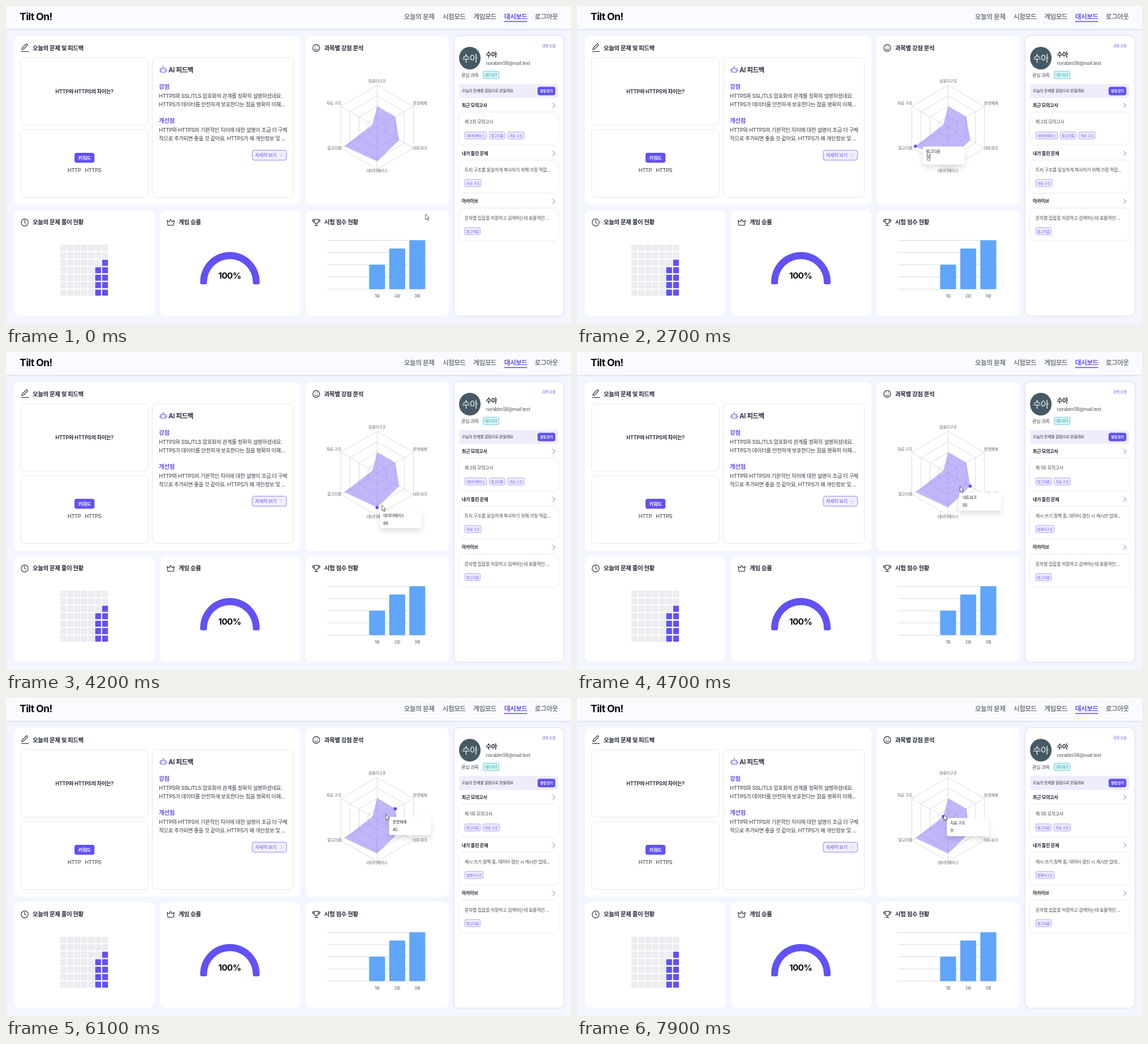
An HTML page for the animation above (8 s loop, 998 by 561 pixels).

```html
<!DOCTYPE html>
<html lang="ko">
<head>
<meta charset="utf-8">
<style>
html, body { margin: 0; height: 100%; overflow: hidden; background: #f3f5ff; }
svg { display: block; width: 998px; height: 561px; }
text { font-family: Inter, "Noto Sans CJK KR", "Noto Sans CJK", sans-serif; letter-spacing: -.04em; white-space: pre; }
.line { fill: none; stroke: #3d4353; stroke-width: 1.3; stroke-linecap: round; stroke-linejoin: round; }
.soft { filter: drop-shadow(0 0 2px rgba(60, 60, 110, .16)); }
#tip rect { filter: drop-shadow(0 5px 5px rgba(0, 0, 0, .13)); }
</style>
</head>
<body>
<svg id="stage" viewBox="0 0 998 561"></svg>
<script>
const PURPLE = '#6151f6', INK = '#222936', GREY = '#444b57';
const stage = document.getElementById('stage');

// ---- drawing helpers ----
const text = (x, y, size, str, fill = INK, weight = 400, anchor = 'start') =>
  `<text x="${x}" y="${y}" font-size="${size}" fill="${fill}" font-weight="${weight}" text-anchor="${anchor}">${str}</text>`;
const rect = (x, y, w, h, r, fill, extra = '') =>
  `<rect x="${x}" y="${y}" width="${w}" height="${h}" rx="${r}" fill="${fill}" ${extra}/>`;
const line = (d, extra = '') => `<path class="line" d="${d}" ${extra}/>`;
const tag = (x, y, w, str) =>
  rect(x + .4, y + .4, w - .8, 12.6, 2, '#f0eefe', 'stroke="#988ef9" stroke-width=".8"') +
  text(x + w / 2, y + 9, 6.2, str, PURPLE, 500, 'middle');
const chevron = (x, y, w, h, color, width) =>
  line(`M${x} ${y}l${w} ${h}l${-w} ${h}`, `style="stroke:${color};stroke-width:${width}"`);

// ---- radar geometry ----
const CX = 655.5, CY = 214, R = 74;
const axes = [
  ['컴퓨터구조', 40, .5], ['운영체제', 40, .5], ['네트워크', 50, .61],
  ['데이터베이스', 66, .815], ['알고리즘', 72, .9], ['자료 구조', 11, .13]
];
const polar = (i, r) => {
  const a = i * Math.PI / 3;
  return [CX + r * Math.sin(a), CY - r * Math.cos(a)];
};
const hexagon = radius => axes.map((a, i) => polar(i, radius(a))).join(' ');

function header() {
  let s = rect(0, 0, 998, 40, 0, '#fafbff', 'style="filter:drop-shadow(0 1px 2px rgba(60,60,110,.14))"');
  s += text(24, 25.3, 17.8, 'Tilt On!', '#0b0b0f', 700);
  [[703, '오늘의 문제'], [771, '시험모드'], [825.5, '게임모드'], [880, '대시보드'], [934, '로그아웃']].forEach(([x, str], i) => {
    s += text(x, 22.6, 11.6, str, i == 3 ? PURPLE : '#333a46', i == 3 ? 600 : 500);
  });
  return s + rect(880, 26.6, 40.5, 1.6, 0, PURPLE);
}

function panels() {
  const boxes = [[14, 53, 506, 297.5], [529, 53, 253, 297.5], [14, 360.5, 248.5, 186], [272, 360.5, 248, 186], [529, 360.5, 253, 186]];
  const titles = [[47, 77.8, '오늘의 문제 및 피드백'], [562, 77.8, '과목별 강점 분석'], [47, 385.4, '오늘의 문제 풀이 현황'], [305, 385.4, '게임 승률'], [562, 385.4, '시험 점수 현황']];
  return boxes.map(b => rect(...b, 9, '#fff')).join('') +
    rect(792, 53, 192.5, 493.5, 9, '#fff', 'class="soft"') +
    titles.map(([x, y, str]) => text(x, y, 10.5, str, INK, 600)).join('') +
    line('M28 77l.6-3 7-7q1-.8 2 .2t.2 2l-7 7zM27 80.3h13') +
    '<circle class="line" cx="548" cy="74" r="6"/>' + line('M545.3 75.6q2.7 3 5.4 0M546 72v.3M550 72v.3') +
    '<circle class="line" cx="33" cy="381.8" r="6.2"/>' + line('M33 378v4l2.4 1.3') +
    line('M286 386.8l-1.3-8.6 3.6 2.6 2.6-4.4 2.6 4.4 3.6-2.6-1.3 8.6z') +
    line('M544.6 376.3h7v4q0 3.6-3.5 3.6t-3.5-3.6zM544.6 377.5h-3q0 4 3.4 4M551.6 377.5h3q0 4-3.4 4M548.1 384v3M545.4 387.4h5.4');
}

function feedback() {
  const border = 'stroke="#e3e5ea" stroke-width=".9"';
  return rect(25.8, 91, 225.4, 119, 7, '#fff', border) + rect(25.8, 218, 225.4, 119.6, 7, '#fff', border) +
    rect(258.5, 91, 249.2, 246.6, 7, '#fff', border) +
    text(138.5, 153.5, 9.3, 'HTTP와 HTTPS의 차이는?', INK, 600, 'middle') +
    rect(121, 259, 35.3, 17.4, 4, PURPLE) + text(138.6, 271, 8.4, '키워드', '#fff', 600, 'middle') +
    text(108.7, 292.6, 9.3, 'HTTP', '#333a46') + text(139.2, 292.6, 9.3, 'HTTPS', '#333a46') +
    line('M273.5 110h8.5v6.8h-8.5zM277.8 110v-3.4M271.8 112.5v2M283.7 112.5v2M276 112.8v.5M279.6 112.8v.5M277.8 106v-.3', `style="stroke:${PURPLE};stroke-width:1.1"`) +
    text(287, 116.6, 11.6, 'AI 피드백', INK, 600) +
    text(270, 146, 10.5, '강점', PURPLE, 600) + text(270, 206, 10.5, '개선점', PURPLE, 600) +
    ['HTTPS와 SSL/TLS 암호화의 관계를 정확히 설명하셨네요.', 'HTTPS가 데이터를 안전하게 보호한다는 점을 명확히 이해...',
      'HTTP와 HTTPS의 기본적인 차이에 대한 설명이 조금 더 구체', '적으로 추가되면 좋을 것 같아요. HTTPS가 왜 개인정보 및 ...']
      .map((str, i) => text(270, [162, 177, 222.4, 237.4][i], 9.35, str, '#333a46')).join('') +
    rect(435, 254.4, 60.6, 17.6, 4, '#f0eefe', 'stroke="#8379f8" stroke-width=".9"') +
    text(440, 266.4, 8.1, '자세히 보기', PURPLE, 500) + chevron(485.2, 260.8, 2.4, 2.5, '#a79ffa', .8);
}

function radar() {
  let s = '';
  for (let k = 1; k <= 4; k++) s += `<polygon points="${hexagon(() => R * k / 4)}" fill="none" stroke="#ccc" stroke-width=".7"/>`;
  axes.forEach((a, i) => { s += `<path d="M${CX} ${CY}L${polar(i, R)}" stroke="#ccc" stroke-width=".7"/>`; });
  s += `<polygon points="${hexagon(a => R * a[2])}" fill="#8171f7" fill-opacity=".5"/>`;
  const spots = [[CX, 135, 'middle'], [718.8, 174.4], [718.8, 253], [CX, 292.6, 'middle'], [592.2, 253, 'end'], [592.2, 174.4, 'end']];
  spots.forEach(([x, y, anchor], i) => { s += text(x, y, 7.05, axes[i][0], '#666', 400, anchor); });
  return s;
}

function charts() {
  let s = '';
  for (let c = 0; c < 7; c++) for (let r = 0; r < 7; r++) {
    const on = c == 6 && r > 1 || c == 5 && r > 2;
    s += rect(96.3 + c * 12.25, 421.3 + r * 13.15, 10.3, 10.8, 1.2, on ? PURPLE : '#ecedf0', on ? '' : 'stroke="#e2e3e6" stroke-width=".5"');
  }
  s += `<path d="M343 488q0 3 3 3h6q3 0 3-3v-1A40.5 40.5 0 0 1 436 487v1q0 3 3 3h6q3 0 3-3v-1.5A52.5 52.5 0 0 0 343 486.5z" fill="${PURPLE}"/>`;
  s += text(395, 481.4, 15.2, '100%', '#0b0b0f', 700, 'middle');
  for (let k = 0; k < 5; k++) s += rect(567, 413 + k * 21.5, 177, .8, 0, '#d0d2d6');
  [456.3, 427.8, 413.2].forEach((y, i) => {
    const x = 641.4 + i * 35.5;
    s += rect(x, y, 28.2, 499.5 - y, 2, '#60a5fa') + text(x + 14.1, 514.4, 7, `${i + 1}회`, '#555', 400, 'middle');
  });
  return s;
}

function sidebar() {
  let s = text(946.8, 72.6, 6.4, '과목 수정', PURPLE, 500) +
    '<ellipse cx="819.3" cy="92" rx="19" ry="20" fill="#455a64"/>' +
    text(819.3, 97.8, 15.6, '수아', '#fff', 400, 'middle') +
    text(847.5, 90.3, 11.2, '수아', INK, 600) +
    text(847.5, 103.6, 8.3, 'norabim58@mail.test', '#6b7079', 500) +
    text(804, 124.5, 8.2, '관심 과목', GREY) +
    rect(843, 115, 27.6, 13, 2, '#dcf6f8', 'stroke="#45bccb" stroke-width=".8"') +
    text(856.8, 124, 6.25, '네트워크', '#129bad', 500, 'middle') +
    rect(800.5, 137.6, 174.5, 24.6, 2, '#efedfd') +
    text(805, 152.4, 7, '오늘의 문제를 알림으로 받을래요', '#333a46', 500) +
    rect(939, 142.4, 31.3, 15, 4, PURPLE) + text(954.6, 152.1, 6, '알림 받기', '#fff', 700, 'middle');
  ['최근 모의고사', '내가 틀린 문제', '아카이브'].forEach((str, i) => {
    const y = i * 84.7;
    s += text(805, 178 + y, 8.15, str, INK, 600) + chevron(965.8, 171.3 + y, 4, 4, PURPLE, .9) +
      rect(801, 188 + y, 174, 56.3, 8, '#fff', 'class="soft"');
  });
  const slide = (id, exam, tags, wrong, subject, w) => `<g id="${id}">` + text(810, 207.2, 8, exam, GREY) +
    tags.map(t => tag(t[0], 221.7, t[1], t[2])).join('') + text(810, 291.8, 8, wrong, GREY) + tag(810, 305.7, w, subject) + '</g>';
  return s +
    slide('before', '제 2회 모의고사', [[810, 39, '데이터베이스'], [853.5, 28, '알고리즘'], [886, 29.5, '자료 구조']], '트리 구조를 동일하게 복사하기 위해 가장 적합...', '자료 구조', 29.7) +
    slide('after', '제 1회 모의고사', [[810, 28, '알고리즘'], [842.3, 29.5, '자료 구조']], '캐시 쓰기 정책 중, 데이터 갱신 시 캐시만 업데...', '컴퓨터구조', 33.3) +
    text(810, 376.5, 8, '문자열 집합을 저장하고 검색하는데 효율적인 ...', GREY) + tag(810, 390.5, 28, '알고리즘');
}

stage.innerHTML = panels() + header() + feedback() + radar() + charts() + sidebar() +
  `<circle id="dot" r="2.9" fill="${PURPLE}"/>` +
  `<g id="tip">${rect(0, 0, 74, 32, 3, '#fff')}${text(6, 11.5, 7, '', INK, 500)}${text(6, 25.4, 7.2, '', INK)}</g>` +
  '<path id="cursor" d="M0 0V10l2.3-2 1.6 3.5 1.5-.7-1.5-3.4h3z" fill="#fff" stroke="#3a3a40" stroke-width=".8" stroke-linejoin="round"/>';

const [before, after, dot, tip, cursor] = ['before', 'after', 'dot', 'tip', 'cursor'].map(id => document.getElementById(id));
const [tipName, tipValue] = tip.querySelectorAll('text');

// ---- motion ----
const LOOP = 8000, STEP = 100, ENTER = 1800;
const path = [
  [900, 741, 367], [1600, 611, 291], [1900, 615, 259], [2500, 616, 256], [2650, 616, 256], [3500, 656, 252],
  [3900, 660, 278], [4200, 664, 270], [4700, 676.5, 237], [5250, 676, 211], [5900, 673, 207], [6000, 673, 207],
  [6100, 671, 205], [6900, 658, 195], [7200, 656, 196], [7800, 648, 206]
];
const clamp = v => Math.max(0, Math.min(1, v));
const smooth = v => v * v * (3 - 2 * v);
const mix = (a, b, k) => a + (b - a) * k;

function pointer(t) {
  let i = 0;
  while (i < path.length - 2 && t > path[i + 1][0]) i++;
  const [a, b] = [path[i], path[i + 1]];
  let k = clamp((t - a[0]) / (b[0] - a[0]));
  if (i == 0) k = smooth(k);
  return [mix(a[1], b[1], k), mix(a[2], b[2], k)];
}

const nearestAxis = ([x, y]) => (Math.round(Math.atan2(x - CX, CY - y) / (Math.PI / 3)) + 6) % 6;

// The tooltip snaps to the nearest axis and trails behind the pointer.
function tipPlace(t) {
  let x = 0, y = 0;
  const n = 8;
  for (let i = 0; i < n; i++) {
    const p = pointer(Math.max(ENTER, t - i * 40));
    const q = polar(nearestAxis(p), Math.hypot(p[0] - CX, p[1] - CY));
    x += (q[0] + 5) / n;
    y += (q[1] + 5) / n;
  }
  const k = smooth(clamp((t - 1700) / 800));
  return [mix(678, x, k), mix(211, y, k)];
}

function draw(t) {
  const p = pointer(t), i = nearestAxis(p), shown = t >= ENTER;
  cursor.setAttribute('transform', `translate(${p})`);
  dot.style.display = tip.style.display = shown ? '' : 'none';
  if (shown) {
    const [name, value, share] = axes[i];
    dot.setAttribute('transform', `translate(${polar(i, R * share)})`);
    tip.setAttribute('transform', `translate(${tipPlace(t)})`);
    tipName.textContent = name;
    tipValue.textContent = value;
  }
  const fade = smooth(clamp((t - 4150) / 500));
  before.style.opacity = 1 - fade;
  after.style.opacity = fade;
}

const start = performance.now();
function tick() {
  const t = (performance.now() - start) % LOOP;
  draw(Math.floor(t / STEP) * STEP);
  requestAnimationFrame(tick);
}
tick();
</script>
</body>
</html>
```
